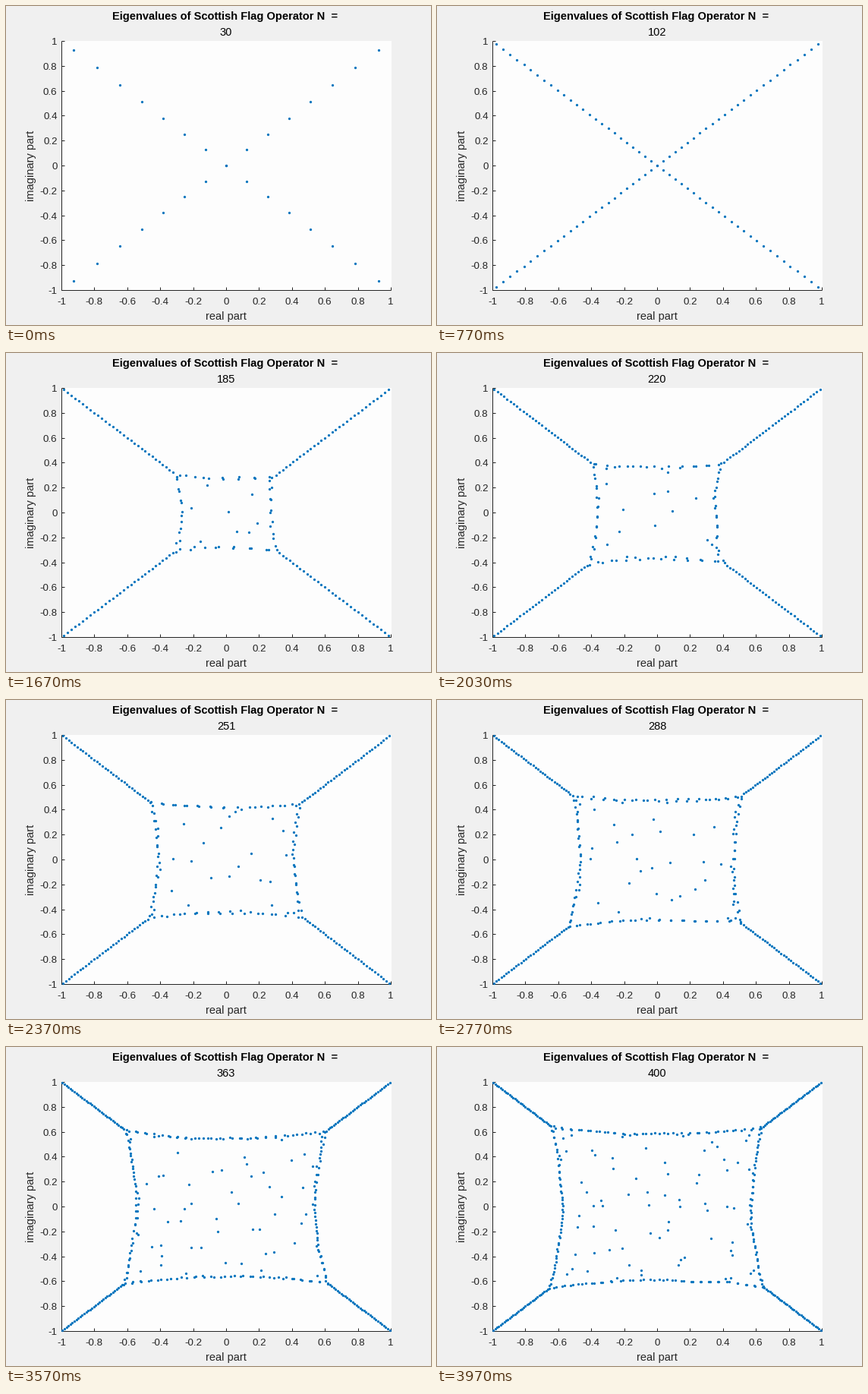
A matplotlib script for the animation above (4.01 s loop, 560 by 420 pixels).

```python
from functools import lru_cache

import numpy as np
import matplotlib.pyplot as plt
from matplotlib.animation import FuncAnimation
from matplotlib.patches import Rectangle

W, H, DPI = 560, 420, 100
PT = 72 / DPI                      # points per pixel
STEPS, TICK_MS, LOOP_MS = 120, 10, 4010
LEFT, RIGHT, TOP, BOTTOM = 73, 507, 46, 374
INK = "#262626"
DOT = "#0072bd"

plt.rcParams["font.family"] = "Liberation Sans"
plt.rcParams["toolbar"] = "None"


def to_x(v):
    return LEFT + (v + 1) / 2 * (RIGHT - LEFT)


def to_y(v):
    return BOTTOM - (v + 1) / 2 * (BOTTOM - TOP)


@lru_cache(maxsize=None)
def spectrum(n):
    """Eigenvalues of cos(x) + i cos(p) quantised on a torus."""
    k = np.arange(n) - n // 2
    cos = np.cos(2 * np.pi * k / n)
    fourier = np.exp(2j * np.pi * np.outer(k, k) / n) / np.sqrt(n)
    cos_p = (fourier.conj().T * cos) @ fourier
    return np.linalg.eigvals(np.diag(cos) + 1j * cos_p)


fig = plt.figure(figsize=(W / DPI, H / DPI), dpi=DPI, facecolor="#f0f0f0")
ax = fig.add_axes([0, 0, 1, 1])
ax.set(xlim=(0, W), ylim=(H, 0))
ax.axis("off")


def label(x, y, text, size, ha="center", va="baseline", **kw):
    kw.setdefault("color", INK)
    return ax.text(x, y, text, fontsize=size * PT, ha=ha, va=va, **kw)


def line(xs, ys):
    ax.plot(xs, ys, color=INK, lw=PT, solid_capstyle="butt")


ax.add_patch(Rectangle((LEFT, TOP), RIGHT - LEFT + 1, BOTTOM - TOP + 1,
                       fc="#fdfdfd", lw=0))
line([LEFT, LEFT], [TOP, BOTTOM])
line([LEFT, RIGHT], [BOTTOM, BOTTOM])

for k in range(-5, 6):
    v = k / 5
    x, y = to_x(v), to_y(v)
    line([x, x], [BOTTOM, BOTTOM - 4])
    line([LEFT, LEFT + 4], [y, y])
    label(x, 393, f"{v:g}", 13.33)
    label(67.5, y + 5, f"{v:g}", 13.33, ha="right")

label(290, 413, "real part", 14.67)
label(32.5, 210, "imaginary part", 14.67, va="center", rotation=90)
label(288.5, 18, "Eigenvalues of Scottish Flag Operator N  =", 14.67,
      weight="bold", color="black")
count = label(290, 39, "", 14.67, color="black")
dots, = ax.plot([], [], "o", ms=3 * PT, mfc=DOT, mec=DOT, mew=0.2)


def update(tick):
    # 30 steps per second, each starting on the nearest 10 ms
    step = min(int(0.3 * tick + 0.15), STEPS - 1)
    n = round(30 + 370 * step / (STEPS - 1))
    z = spectrum(n)
    dots.set_data(to_x(z.real), to_y(z.imag))
    count.set_text(str(n))
    return dots, count


anim = FuncAnimation(fig, update, frames=LOOP_MS // TICK_MS, interval=TICK_MS,
                     repeat=True, repeat_delay=0, cache_frame_data=False)
plt.show()
```
